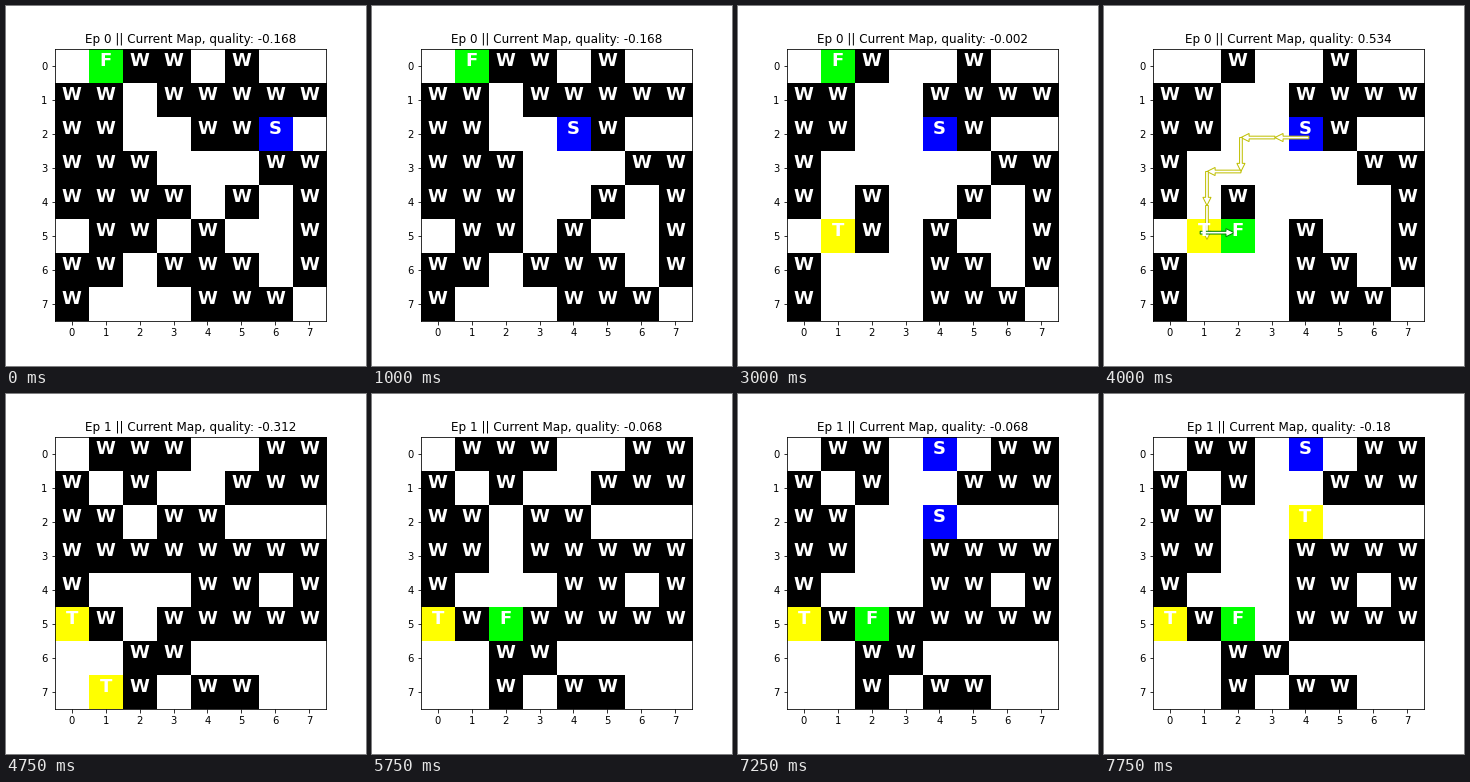
Animation, 360 px wide and 360 px high, one loop 8 s. Source, as a matplotlib script:

```python
import matplotlib.pyplot as plt
import numpy as np
from matplotlib.animation import FuncAnimation

plt.rcParams["font.family"] = "DejaVu Sans"

SIZE = 8
FRAMES, INTERVAL = 32, 250
COLORS = {".": (255, 255, 255), "W": (0, 0, 0), "S": (0, 0, 255),
          "F": (0, 255, 0), "T": (255, 255, 0)}

# Each edit is (row, column, tile, quality); None leaves the map as it is.
EPISODES = [
    {
        "start": 0, "first_edit": 2, "quality": -0.168,
        "map": ".FWW.W.. WW.WWWWW WW..WWS. WWW...WW "
               "WWWW.W.W .WW.W..W WW.WWW.W W...WWW.",
        "edits": [
            (4, 3, ".", -0.168), (2, 6, ".", -0.234), (2, 4, "S", -0.168),
            (3, 2, ".", -0.168), (5, 1, "T", -0.002), (3, 1, ".", -0.002),
            (4, 1, ".", -0.002), (0, 3, ".", -0.002), (1, 3, ".", -0.002),
            (6, 1, ".", -0.002), (6, 3, ".", -0.002), (0, 1, ".", -0.068),
            (4, 5, ".", -0.068), (5, 2, "F", 0.534), None,
        ],
    },
    {
        "start": 19, "first_edit": 21, "quality": -0.312,
        "map": ".WWW..WW W.W..WWW WW.WW... WWWWWWWW "
               "W...WW.W TW.WWWWW ..WW.... .TW.WW..",
        "edits": [
            (3, 2, ".", -0.312), (7, 1, ".", -0.134), (5, 2, "F", -0.068),
            (3, 3, ".", -0.068), (2, 3, ".", -0.068), (0, 3, ".", -0.068),
            (0, 4, "S", -0.002), (2, 4, ".", -0.002), (2, 4, "S", -0.068),
            (2, 4, "T", -0.18), (5, 3, ".", -0.18),
        ],
    },
]
PATH_FRAMES = range(16, 19)
PATH_TO_TREASURE = [(4, 2), (3, 2), (2, 2), (2, 3), (1, 3), (1, 4), (1, 5)]
PATH_TO_FINISH = [(1, 5), (2, 5)]


def state_at(frame):
    """Return the episode number, tile grid and quality for a frame."""
    number = 1 if frame >= EPISODES[1]["start"] else 0
    episode = EPISODES[number]
    grid = [list(row) for row in episode["map"].split()]
    quality = episode["quality"]
    done = max(0, frame - episode["first_edit"] + 1)
    for edit in filter(None, episode["edits"][:done]):
        row, col, tile, quality = edit
        grid[row][col] = tile
    return number, grid, quality


def draw_path(cells, offset, color):
    return [
        ax.arrow(x0 + offset, y0 + offset, x1 - x0, y1 - y0, width=0.08,
                 head_width=0.24, head_length=0.24, length_includes_head=True,
                 fc="white", ec=color, lw=1)
        for (x0, y0), (x1, y1) in zip(cells, cells[1:])
    ]


fig = plt.figure(figsize=(5, 5), dpi=72, facecolor="white")
ax = fig.add_axes([0.135, 0.125, 0.755, 0.755])
image = ax.imshow(np.zeros((SIZE, SIZE, 3), np.uint8))
ax.set_xticks(range(SIZE))
ax.set_yticks(range(SIZE))
title = ax.set_title("", fontsize=12)
labels = [[ax.text(col, row, "", color="white", fontsize=18, weight="bold",
                   ha="center") for col in range(SIZE)] for row in range(SIZE)]
arrows = (draw_path(PATH_TO_TREASURE, 0.1, "y")
          + draw_path(PATH_TO_FINISH, -0.1, "g"))
ax.set_xlim(-0.5, SIZE - 0.5)
ax.set_ylim(SIZE - 0.5, -0.5)


def update(frame):
    number, grid, quality = state_at(frame)
    image.set_data(np.array([[COLORS[t] for t in row] for row in grid],
                            np.uint8))
    for label_row, row in zip(labels, grid):
        for label, tile in zip(label_row, row):
            label.set_text("" if tile == "." else tile)
    title.set_text(f"Ep {number} || Current Map, quality: {quality}")
    for arrow in arrows:
        arrow.set_visible(frame in PATH_FRAMES)
    return [image, title, *arrows]


animation = FuncAnimation(fig, update, frames=FRAMES, interval=INTERVAL,
                          repeat=True, repeat_delay=0, blit=False)
plt.show()
```
